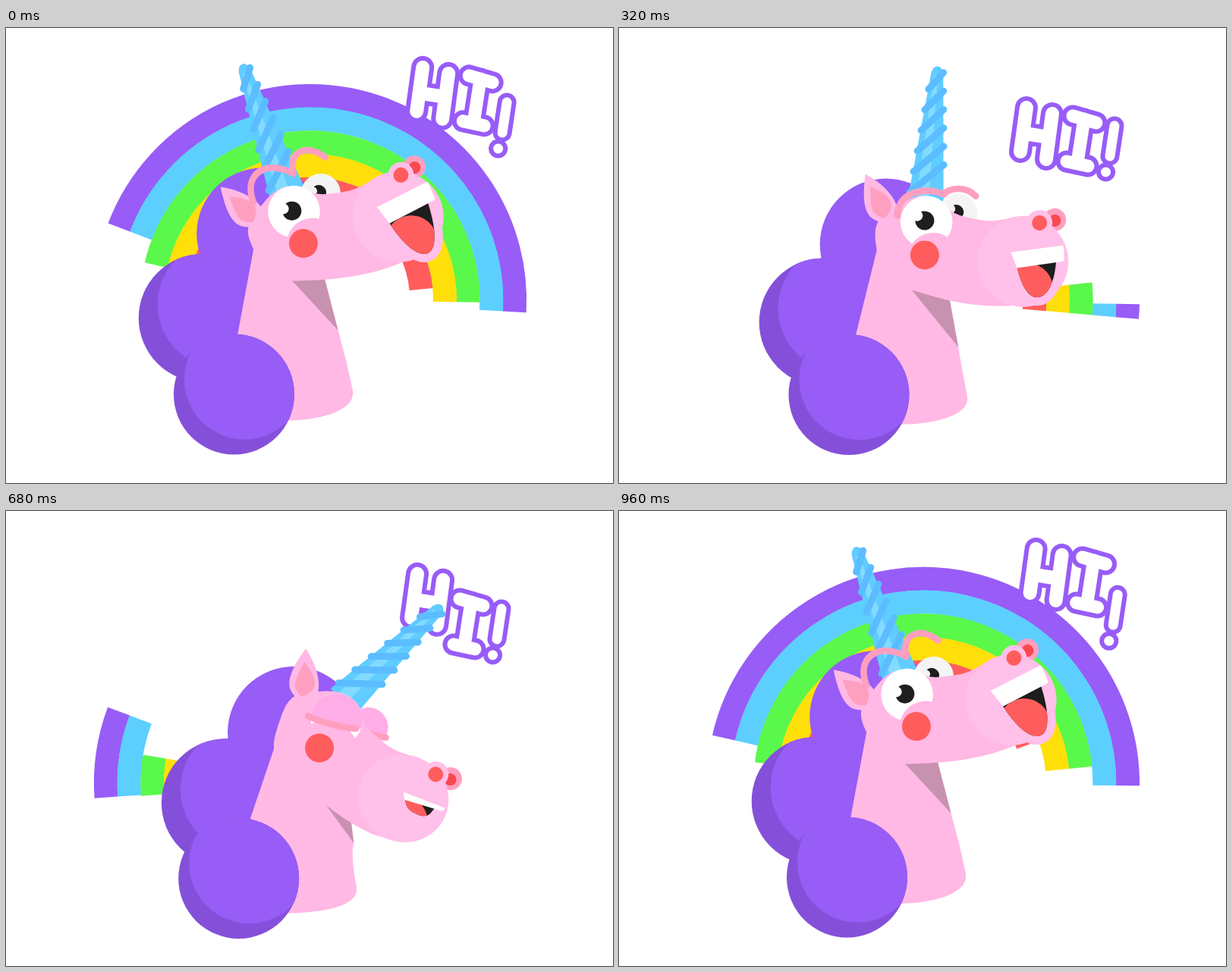
Write an HTML page with a canvas that moves like this. It is 800 by 600 pixels and loops after 1 s.

```html
<!DOCTYPE html>
<html lang="en">
<head>
<meta charset="utf-8">
<title>Unicorn says hi</title>
<style>
  html, body { margin: 0; width: 100%; height: 100%; overflow: hidden; background: #fff; }
  canvas { display: block; width: 800px; height: 600px; }
</style>
</head>
<body>
<canvas id="stage" width="800" height="600"></canvas>
<script>
const ctx = document.getElementById('stage').getContext('2d');
const LOOP = 1000, STEP = 40, CUT = 480, RAD = Math.PI / 180;
const PURPLE = '#985cf7', SHADE = '#8550d9', SKIN = '#ffb9e4', MUZZLE = '#ffc0e9',
      ROSE = '#ff9fc0', LID = '#ffade6', RED = '#ff5d5d', BLACK = '#1e1e1e',
      BLUE = '#5ccfff', GREEN = '#5af84a', YELLOW = '#ffdf09';

// Time counted from the calm pose, so each gesture runs without a break
const wrap = (t, start = CUT) => (t - start + 2 * LOOP) % LOOP + start;
const mix = (a, b, k) => a + (b - a) * k;
function ramp(t, from, to) {
  const u = Math.min(1, Math.max(0, (t - from) / (to - from)));
  return u * u * (3 - 2 * u);
}
const pulse = (t, a, b, c, d) => ramp(t, a, b) - ramp(t, c, d);

// Nod down, throw back, settle
function tilt(t) {
  const u = wrap(t);
  return 22 * ramp(u, 480, 660) - 49 * ramp(u, 660, 880) + 27 * ramp(u, 1060, 1460);
}

function pose(t) {
  const u = wrap(t), a = tilt(t);
  return {
    a,
    hair: tilt(t - 35),
    horn: 0.37 * tilt(t - 60),
    awake: 1 - pulse(u, 500, 660, 760, 940),
    lid: pulse(u, 500, 670, 740, 900),
    squint: pulse(u, 540, 670, 690, 800),
    lift: pulse(u, 800, 950, 1110, 1310),
    wow: pulse(u, 820, 990, 1020, 1150)
  };
}

function fill(color) { ctx.fillStyle = color; ctx.fill(); }
function disc(x, y, r, color, ry = r) {
  ctx.beginPath();
  ctx.ellipse(x, y, r, ry, 0, 0, 7);
  fill(color);
}
function poly(color, ...pts) {
  ctx.beginPath();
  pts.forEach(p => ctx.lineTo(p[0], p[1]));
  ctx.closePath();
  fill(color);
}
function stroke(color, width) {
  ctx.strokeStyle = color;
  ctx.lineWidth = width;
  ctx.stroke();
}
function smooth(pts) {
  const mid = (a, b) => [(a[0] + b[0]) / 2, (a[1] + b[1]) / 2];
  ctx.beginPath();
  ctx.moveTo(...mid(pts[pts.length - 1], pts[0]));
  pts.forEach((p, i) => ctx.quadraticCurveTo(...p, ...mid(p, pts[(i + 1) % pts.length])));
  ctx.closePath();
}
function group(draw) { ctx.save(); draw(); ctx.restore(); }

// S-curve from just below the left foot to just below the right foot
function sweep(t, mid, slow, fast) {
  const x = (t - mid) * (t < mid ? slow : fast);
  return -5 + 190 / (1 + Math.exp(-x));
}
function rainbow(t) {
  ctx.lineCap = 'butt';
  [PURPLE, BLUE, GREEN, YELLOW, RED].forEach((color, i) => {
    const u = wrap(t - STEP * Math.floor(i / 2), 460);
    const from = sweep(u, 1176, 0.0105, 0.0268), to = sweep(u, 800, 0.0155, 0.0235);
    if (to - from < 0.5) return;
    ctx.beginPath();
    ctx.arc(401, 359, 269.6 - 30.7 * i, (180 + from) * RAD, (180 + to) * RAD);
    stroke(color, 31);
  });
}

function glyph(t, lag, width, ...lines) {
  const u = wrap(t), hop = 55 * Math.max(0, pulse(u, 580 + lag, 810 + lag, 960, 1320));
  group(() => {
    ctx.translate(0.23 * hop, -hop);
    ctx.lineCap = ctx.lineJoin = 'round';
    ctx.beginPath();
    for (const [a, b, c, d] of lines) { ctx.moveTo(a, b); ctx.lineTo(c, d); }
    stroke(PURPLE, width + 12);
    stroke('#fff', width);
  });
}
function greeting(t) {
  glyph(t, 0, 18, [537, 105, 529, 163], [571, 113, 563, 173], [534, 139, 566, 144]);
  glyph(t, 130, 17, [598, 116, 629, 125], [613, 120, 604, 178], [590, 176, 618, 182]);
  glyph(t, 290, 13, [653, 129, 647, 169]);
  glyph(t, 290, 13, [641.5, 190, 641.6, 190]);
}

function curl(x, y, r, dx, dy) {
  disc(x, y, r, SHADE);
  group(() => {
    ctx.beginPath();
    ctx.arc(x, y, r, 0, 7);
    ctx.clip();
    disc(x + dx, y + dy, r, PURPLE);
  });
}

function neck(a) {
  const back = 346 + 0.72 * a, k = back - 326;
  const bx = 457 + k * 0.14, by = 480 + k * 0.5, base = 517.5 + k * 0.37;
  const throat = [450.5 + 0.42 * a - 0.002 * a * a, 427 + 0.75 * a - 0.011 * a * a];
  const jaw = [384 + 1.15 * a + 0.021 * a * a, 343 + 1.35 * a + 0.0235 * a * a];
  const top = [411 + (throat[0] - 437) * 1.4, 300];
  ctx.beginPath();
  ctx.moveTo(back + 3, 270);
  ctx.lineTo(back, 290);
  ctx.lineTo(305 + k * 0.5, 404);
  ctx.lineTo(310, 500);
  ctx.lineTo(360, base);
  ctx.lineTo(372, base);
  ctx.bezierCurveTo(bx - 34, base - 1, bx + 4, by + 21, bx, by - 2);
  ctx.quadraticCurveTo(bx - 8, by - 42, ...throat);
  ctx.lineTo(...top);
  ctx.closePath();
  fill(SKIN);
  poly('#c792b0', jaw, throat, top);
}

function horn(lean) {
  group(() => {
    ctx.translate(12.5, -79);
    ctx.rotate((17.8 + lean) * RAD);
    ctx.beginPath();
    ctx.moveTo(-24, 12);
    ctx.lineTo(-8, -160);
    ctx.bezierCurveTo(-6, -173, 6, -173, 8, -160);
    ctx.lineTo(24, 12);
    fill('#60ccff');
    poly('#82dbff', [-13, 12], [-4, -158], [1, -158], [4, 12]);
    ctx.lineCap = 'round';
    ctx.beginPath();
    for (let k = 0; k < 6; k++) {
      const low = 1 + 27.5 * k, high = 41 + 24.2 * k;
      ctx.moveTo(-22 + 0.09 * low, -low);
      ctx.lineTo(23.5 - 0.095 * high, -high);
    }
    stroke('#5bbdff', 9);
  });
}

function eye(x, y, r, white, pupil, brow) {
  group(() => {
    ctx.beginPath();
    ctx.arc(x, y, r, 0, 7);
    fill(white);
    ctx.clip();
    disc(x - 2, y - 2, pupil, BLACK);
    disc(x - 0.31 * r, y - 0.28 * r, pupil * 0.56, white);
    ctx.beginPath();
    brow();
    ctx.lineTo(x + 60, y - 8);
    ctx.lineTo(x + 60, -200);
    ctx.lineTo(x - 60, -200);
    ctx.lineTo(x - 60, y);
    ctx.closePath();
    fill(LID);
  });
}
function drawBrow(brow) {
  ctx.beginPath();
  brow();
  ctx.lineCap = 'round';
  stroke(ROSE, 8.5);
}

function mouth({ awake, wow }) {
  const left = mix(124, 113, awake) - 5 * wow, top = mix(15, 11.5, awake) - 10 * wow;
  const y = top + mix(9, 21.5, awake) + 5 * wow, right = y - 3 * (1 - awake);
  const low = mix(36, 75, awake) + 11 * wow, x = mix(152, 141, awake), d = low - y;
  const path = () => {
    ctx.beginPath();
    ctx.moveTo(left + 5, y - 4);
    ctx.bezierCurveTo(left + 8, y + d * 0.6, x - 13, low, x, low);
    ctx.bezierCurveTo(x + 16, low, 167, y + d * 0.4, 171, right - 4);
  };
  path();
  ctx.lineJoin = 'round';
  stroke(MUZZLE, 22);
  group(() => {
    path();
    fill(BLACK);
    ctx.clip();
    disc(mix(136, 128, awake), mix(52, 62, awake), 34, RED);
  });
  ctx.beginPath();
  ctx.moveTo(left, top);
  ctx.lineTo(181, top);
  ctx.quadraticCurveTo(183, top, 183, top + 3);
  ctx.lineTo(181.5, right - 3);
  ctx.quadraticCurveTo(181, right - 0.5, 178, right - 0.5);
  ctx.lineTo(left + 5, y);
  ctx.closePath();
  fill('#fff');
}

function ear() {
  ctx.beginPath();
  ctx.moveTo(-63.5, -116);
  ctx.bezierCurveTo(-44, -102, -27, -82, -27, -60);
  ctx.bezierCurveTo(-30, -46, -52, -46, -64, -59);
  ctx.bezierCurveTo(-73, -70, -70, -92, -63.5, -116);
  fill(SKIN);
  ctx.beginPath();
  ctx.moveTo(-59, -99);
  ctx.bezierCurveTo(-48, -92, -35, -84, -35, -72);
  ctx.bezierCurveTo(-35, -64, -42, -58, -47, -55);
  ctx.bezierCurveTo(-62, -63, -63, -66, -59, -99);
  fill(ROSE);
}

function drawHead(p) {
  const { a, lid, lift } = p;
  const joinX = 36 - 6 * lift, joinY = -76 + 35 * lid - 12 * lift;
  const near = () => {
    ctx.moveTo(-29 - 5 * lift, -56 + 22 * lid - 22 * lift);
    const peak = -89 + 56 * lid - 31 * lift;
    ctx.bezierCurveTo(-23 - 7 * lift, peak, 12 - 3 * lift, peak, joinX, joinY);
  };
  const far = () => {
    const peak = -84 + 43 * lid - 33 * lift;
    ctx.moveTo(joinX, joinY);
    ctx.bezierCurveTo(joinX + 6, peak, 66 - 2 * lift, peak, 77, -68 + 24 * lid - 20 * lift);
  };
  ctx.translate(405 + 0.25 * a + 0.00032 * a ** 3, 304 + 0.55 * a - 0.007 * a * a);
  ctx.rotate(a * RAD);
  horn(p.horn);
  eye(50.5, -48.5, 26, '#f4f4f4', 10, far);
  drawBrow(far);
  disc(176, -23.5, 15, ROSE);
  disc(176, -22.5, 8, '#f9494f');

  smooth([[-59, 20], [-62, -10], [-62, -40], [-52, -58], [-30, -68], [-10, -77], [12, -79],
    [32, -66], [44, -49], [75, -37], [95, -32], [127, -34], [150, 0], [150, 60],
    [125, 83], [78, 79], [33, 67.5], [-7, 51], [-45, 33]]);
  fill(SKIN);
  const jaw = 57.5 + 2.5 * p.awake;
  disc(127, jaw - 34.5, 60, MUZZLE, jaw);
  disc(155.5, -22, 17, MUZZLE);
  disc(155.5, -22, 10, RED);
  mouth(p);
  ear();
  eye(8, -43, 34.3, '#fff', 12.5, near);
  disc(10.5, 6, 34 + 11 * p.squint, SKIN);
  disc(0, 0, 19, RED);
  drawBrow(near);
}

function draw(t) {
  const p = pose(t), h = p.hair;
  ctx.fillStyle = '#fff';
  ctx.fillRect(0, 0, 800, 600);
  rainbow(t);
  greeting(t);
  disc(361 + 0.84 * h, 291 + 0.35 * h - 0.014 * h * h, 87, PURPLE);
  // The head covers the neck, the lowest curl covers both
  curl(276 + 0.62 * h, 389 - 0.009 * h * h, 84.5, 25, -18);
  neck(p.a);
  group(() => drawHead(p));
  curl(304 + 0.13 * p.a, 483.8 + 0.03 * p.a, 79.5, 14, -20);
}

function tick() {
  draw(Math.floor(performance.now() % LOOP / STEP) * STEP);
  requestAnimationFrame(tick);
}
tick();
</script>
</body>
</html>
```
